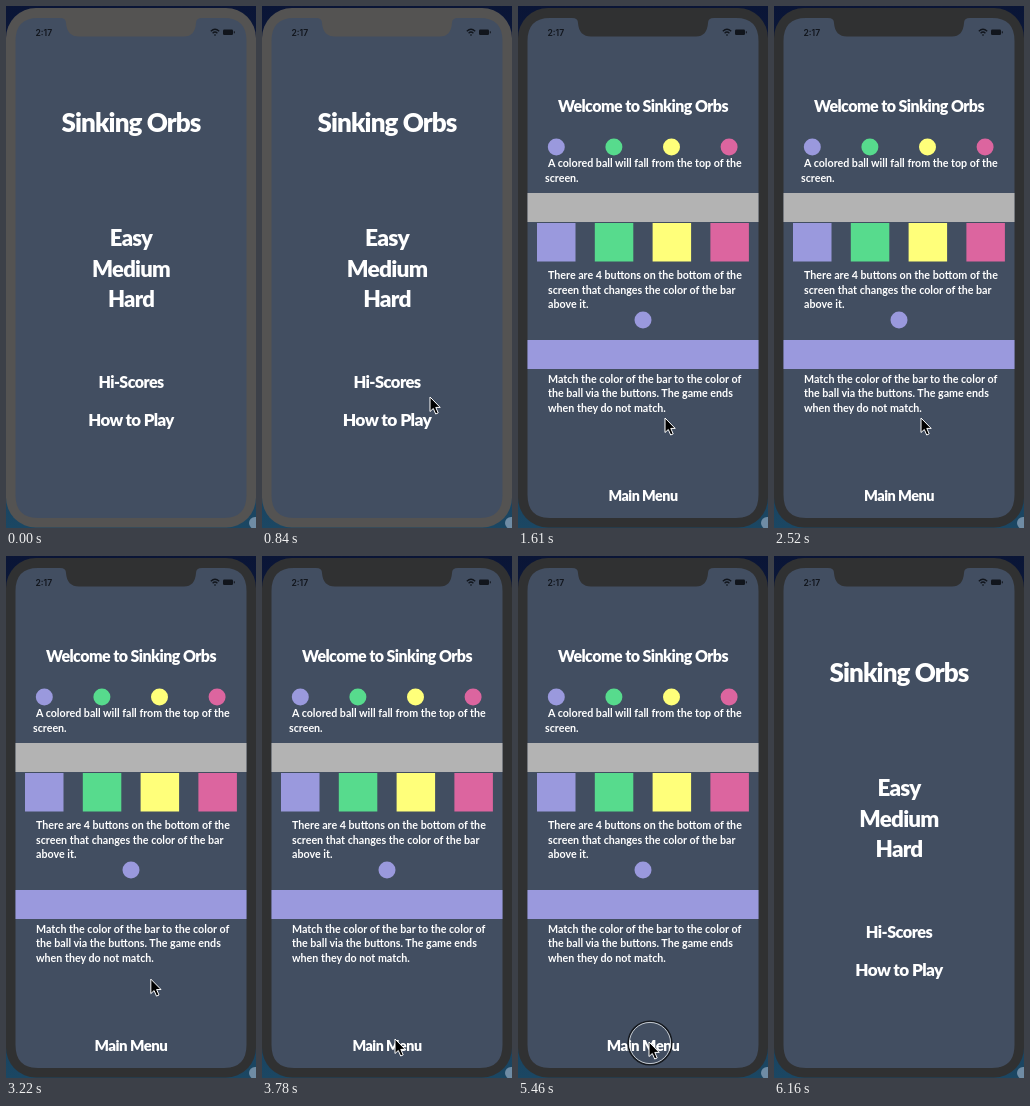
Animation of 250 by 522 pixels, one loop 6.23 s. Source, as an HTML page:

```html
<!DOCTYPE html>
<html lang="en">
<head>
<meta charset="utf-8">
<title>Sinking Orbs</title>
<style>
  html, body { margin: 0; width: 100%; height: 100%; overflow: hidden; background: #0b1836; }
  svg { display: block; width: 250px; height: 522px; }
  text { font-family: Lato, "Open Sans", sans-serif; font-weight: 900; fill: #fff; }
  .mid { text-anchor: middle; letter-spacing: -.035em; }
  .body { font-size: 10.7px; font-weight: 700; }
  .clock { font: 600 8.6px Inter, sans-serif; fill: #11151c; }
</style>
</head>
<body>
<svg viewBox="0 0 250 522" xmlns="http://www.w3.org/2000/svg">
  <defs>
    <linearGradient id="desk" x2="0" y2="1">
      <stop offset="0" stop-color="#0a1536"/>
      <stop offset=".5" stop-color="#10294f"/>
      <stop offset="1" stop-color="#1b4763"/>
    </linearGradient>
  </defs>
  <rect width="250" height="522" fill="url(#desk)"/>
  <circle cx="249" cy="517" r="6" fill="#6f8ca5"/>
  <rect id="bezel" x="0" y="2" width="250" height="519.5" rx="30"/>
  <path fill="#424e61" d="M32 12H54Q60 12 60 17Q61 30.500 73 30.500H178Q189 30.500 190 17Q190 12 196 12H218Q240.500 12 240.500 35V489Q240.500 512 218 512H32Q9.500 512 9.500 489V35Q9.500 12 32 12Z"/>

  <text class="clock" x="29.500" y="30">2:17</text>
  <g fill="none" stroke="#11151c" stroke-width="1.300">
    <path d="M204.800 25.200Q209 21.200 213.200 25.200M206.600 27.200Q209 24.900 211.400 27.200"/>
    <path d="M208.300 29H209.700" stroke-width="1.600"/>
  </g>
  <rect x="217" y="23.500" width="10" height="5.500" rx="1.300" fill="#11151c"/>
  <path d="M228.300 25.300V27.300" stroke="#11151c"/>

  <g id="menu"></g>
  <g id="help"></g>
  <g id="ring" fill="none">
    <circle r="21.800" stroke="#15191f" stroke-width="1.600"/>
    <circle r="20.600" stroke="#e8ebef" stroke-width=".8"/>
  </g>
  <path id="cursor" d="M0 0V14.500L3.300 11.500L5.700 17L8.200 15.900L5.800 10.400H10.200Z" fill="#000" stroke="#fff"/>
</svg>
<script>
const LOOP = 6230, STEP = 70;
const OPEN = 1470, BACK = 5600, FOCUS = 1400;
const PULSE = 1140, GROW = 0.065;
const COLORS = ['#9a99dd', '#57db8d', '#ffff7a', '#dc659f'];

const $ = id => document.getElementById(id);
const menu = $('menu'), help = $('help'), cursor = $('cursor'), ring = $('ring');

function add(parent, tag, attrs, label = '') {
  const el = document.createElementNS('http://www.w3.org/2000/svg', tag);
  for (const key in attrs) el.setAttribute(key, attrs[key]);
  el.textContent = label;
  parent.append(el);
  return el;
}

const pulsing = [];
function centered(parent, label, y, size, pulse) {
  const el = add(parent, 'text', { x: 125, y, class: 'mid', 'font-size': size }, label);
  if (pulse) pulsing.push({ el, y: y - size * 0.3 });
}
const line = (label, y, x = 30) => add(help, 'text', { x, y, class: 'body' }, label);
const ball = (cx, cy, fill) => add(help, 'circle', { cx, cy, r: 8.5, fill });
const bar = (y, fill) => add(help, 'rect', { x: 9.5, y, width: 231, height: 29, fill });

centered(menu, 'Sinking Orbs', 126, 26);
centered(menu, 'Easy', 239.5, 22, true);
centered(menu, 'Medium', 270.5, 22, true);
centered(menu, 'Hard', 301, 22, true);
centered(menu, 'Hi-Scores', 382, 16, true);
centered(menu, 'How to Play', 420, 16.8, true);

centered(help, 'Welcome to Sinking Orbs', 106, 16);
bar(187, '#b3b3b3');
COLORS.forEach((fill, i) => {
  ball(38.3 + i * 57.6, 141, fill);
  add(help, 'rect', { x: 19 + i * 57.8, y: 217, width: 38.5, height: 38.5, fill });
});
line('A colored ball will fall from the top of the', 161);
line('screen.', 176, 27);
line('There are 4 buttons on the bottom of the', 273);
line('screen that changes the color of the bar', 287.5);
line('above it.', 302);
ball(125, 314, COLORS[0]);
bar(334, COLORS[0]);
line('Match the color of the bar to the color of', 377);
line('the ball via the buttons. The game ends', 391);
line('when they do not match.', 405.5);
centered(help, 'Main Menu', 494.5, 14.2, true);

// time, x, y of the pointer tip
const path = [
  [0, 262, 380], [700, 262, 380], [840, 168, 391], [1260, 147, 412],
  [3080, 147, 412], [3640, 133, 483], [5040, 133, 483], [5320, 131, 486],
  [5670, 131, 486], [6020, 262, 510], [LOOP, 262, 510]
];

function pointer(t) {
  const i = path.findIndex(p => p[0] > t);
  const [t0, x0, y0] = path[i - 1], [t1, x1, y1] = path[i];
  const k = (t - t0) / (t1 - t0), e = k * k * (3 - 2 * k);
  return [x0 + (x1 - x0) * e, y0 + (y1 - y0) * e];
}

function draw(t) {
  const onHelp = t >= OPEN && t < BACK;
  menu.style.display = onHelp ? 'none' : '';
  help.style.display = onHelp ? '' : 'none';
  $('bezel').setAttribute('fill', t < FOCUS ? '#545352' : '#303132');

  const start = t >= BACK ? BACK + 390 : t >= OPEN ? OPEN + 80 : 0;
  const phase = ((t - start) / PULSE + 2) % 1;
  const s = 1 + GROW * (1 - Math.abs(1 - 2 * phase));
  for (const { el, y } of pulsing)
    el.setAttribute('transform', `translate(125 ${y}) scale(${s}) translate(-125 ${-y})`);

  const [x, y] = pointer(t);
  cursor.setAttribute('transform', `translate(${x} ${y})`);
  ring.setAttribute('transform', `translate(${x + 1} ${y + 1})`);
  const pressed = (t >= 1330 && t < OPEN) || (t >= 5320 && t < BACK);
  ring.style.display = pressed ? '' : 'none';
}

const begin = performance.now();
function tick() {
  const t = (performance.now() - begin) % LOOP;
  draw(Math.floor(t / STEP) * STEP);
  requestAnimationFrame(tick);
}
tick();
</script>
</body>
</html>
```
